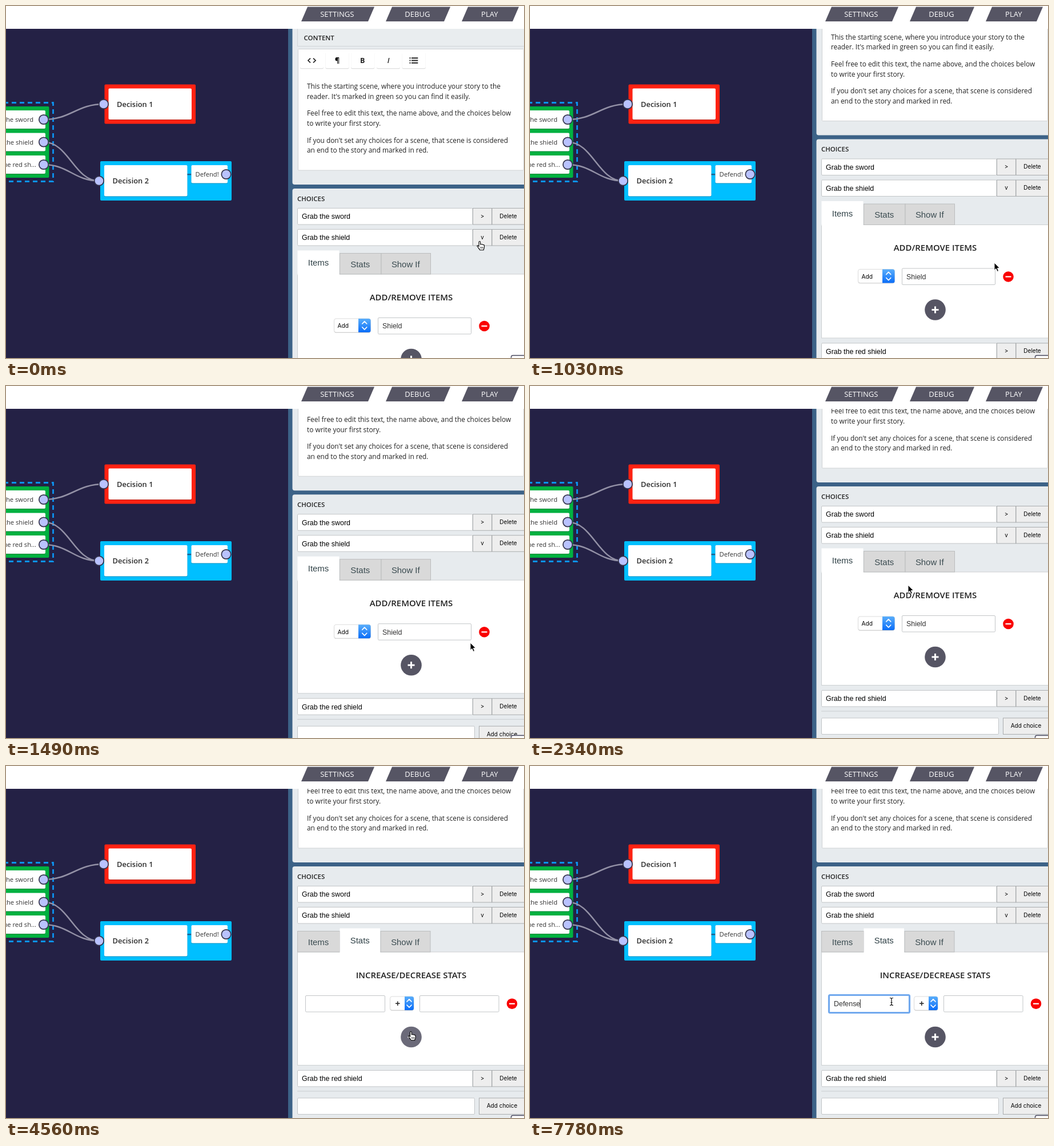
Write an HTML page that moves like this. It is 907 px wide and 617 px high and loops after 8000 ms.

```html
<!DOCTYPE html>
<html lang="en">
<head>
<meta charset="utf-8">
<title>Story editor</title>
<style>
html, body { margin: 0; width: 100%; height: 100%; overflow: hidden; background: #fff; }
svg { display: block; width: 907px; height: 617px; }
text { font-family: "Open Sans", "Noto Sans", sans-serif; white-space: pre; }
.in { font-family: "Liberation Sans", Arial, sans-serif; }
.ui { font-family: Inter, sans-serif; }
</style>
</head>
<body>
<svg id="stage" viewBox="0 0 907 617" xmlns="http://www.w3.org/2000/svg"></svg>
<script>
const LOOP = 8000;
const DARK = '#565564', PANEL = '#e7ebee', BLUE = '#3c6287';

// Drawing helpers; text is placed by the middle of its capitals.
const rect = (x, y, w, h, fill, extra = '') =>
  `<rect x="${x}" y="${y}" width="${w}" height="${h}" fill="${fill}" ${extra}/>`;
const text = (x, mid, s, size, extra = '') =>
  `<text x="${x}" y="${mid + size * 0.36}" font-size="${size}" ${extra}>${s}</text>`;
const path = (d, stroke, w, extra = '') =>
  `<path d="${d}" fill="none" stroke="${stroke}" stroke-width="${w}" ${extra}/>`;
const MID = 'text-anchor="middle" ', END = 'text-anchor="end" ', SEMI = 'font-weight="600" ';
const IN = 'class="in" ', UI = 'class="ui" ';

const skewButton = (x, w, label) =>
  `<path d="M${x + 11} 1.5H${x + w}L${x + w - 11} 27H${x}Z" fill="${DARK}"/>` +
  text(x + w / 2 - 1.2, 14.3, label, 13.06, MID + 'fill="#fff"');

const port = (x, y) =>
  `<circle cx="${x}" cy="${y}" r="8.2" fill="#b9c2ff" stroke="#34334a" stroke-width="1.7"/>`;
const wire = (x1, y1, x2, y2) => {
  const d = (x2 - x1) * 0.45;
  return path(`M${x1} ${y1}C${x1 + d} ${y1} ${x2 - d} ${y2} ${x2} ${y2}`, '#9391a6', 2.5);
};
const card = (x, y, w, h) =>
  rect(x, y + 1, w, h, '#000', 'opacity=".25" rx="2"') + rect(x, y, w, h, '#fff', 'rx="2"');

const field = (x, y, w, value = '') =>
  rect(x + .5, y + .5, w, 28.5, '#fff', 'stroke="#c3c6c8" rx="1.5"') +
  text(x + 8, y + 15, value, 12.43, IN);
const button = (x, y, w, label, cx) =>
  rect(x + .5, y + .5, w, 28.5, '#eeeeee', 'stroke="#a9acae"') +
  text(cx, y + 14.3, label, 10, UI + MID);
const choice = (y, value, mark) =>
  field(510, y, 306.5, value) + button(817, y, 33, mark, 834) + button(850.5, y, 70, 'Delete', 879.5);

const select = (x, y, w, arrowW, label) => {
  const c = x + w - arrowW / 2, m = y + 12;
  return rect(x, y + .8, w, 24, '#000', 'opacity=".25" rx="3.5"') +
    rect(x, y, w, 24, '#fff', 'stroke="#d4d4d4" stroke-width=".8" rx="3.5"') +
    `<path d="M${x + w - arrowW} ${y}h${arrowW - 3.5}q3.5 0 3.5 3.5v17q0 3.5 -3.5 3.5h${3.5 - arrowW}z" fill="url(#arrow)"/>` +
    path(`M${c - 4} ${m - 3}l4 -4.2l4 4.2M${c - 4} ${m + 3}l4 4.2l4 -4.2`, '#fff', 1.7,
      'stroke-linecap="round" stroke-linejoin="round"') + label;
};
const minus = (x, y) =>
  `<circle cx="${x}" cy="${y}" r="9.3" fill="#f90000"/>` + rect(x - 5, y - 1.1, 10, 2.2, '#fff');
const plus = id => `<g id="${id}"><circle r="18.3" fill="${DARK}"/>` +
  path('M-6 0H6M0 -6V6', '#fff', 3) + '</g>';

const tab = (x, w, label, active) => active
  ? rect(x + .5, 428.5, w - 1, 43, '#fff') + text(x + w / 2, 449.7, label, 14.9, IN + MID + 'fill="#2f4046"')
  : rect(x + .5, 433.5, w, 36.5, '#d9d9d9', 'stroke="#bbbdbe"') +
    text(x + w / 2, 452.2, label, 14.9, IN + MID + 'fill="#3a4b50"');
const tabs = (edges, on) => ['Items', 'Stats', 'Show If']
  .map((s, i) => tab(edges[i], edges[i + 1] - edges[i], s, i === on)).join('');
const heading = s => text(709.5, 510.3, s, 14.92, MID + SEMI + 'fill="#222"');

const nodes = () =>
  rect(0, 40, 494, 577, '#242145') +
  rect(-20, 176, 95.5, 125, '#00b140', 'rx="2"') +
  [183, 222.5, 262].map(y => card(-20, y, 89, 32)).join('') +
  text(48, 199, 'Grab the sword', 11.2, END + 'fill="#333"') +
  text(48, 238.5, 'Grab the shield', 11.2, END + 'fill="#333"') +
  text(53, 278, 'Grab the red sh...', 11.2, END + 'fill="#333"') +
  path('M-4 169.5H82.5V307.5H-4', '#0c93f2', 2.8, 'stroke-dasharray="8 6"') +
  wire(66, 199, 171, 172) + wire(66, 238.5, 163, 306.5) + wire(66, 278, 163, 306.5) +
  rect(172.5, 137.5, 159.5, 69, '#ff2212', 'rx="2"') + card(179.5, 144.5, 145.5, 54.5) +
  text(194, 172.3, 'Decision 1', 12.9, SEMI + 'fill="#2b2b2b"') +
  rect(165, 272, 230, 69, '#00bfff', 'rx="2"') + card(172, 279, 145.5, 54.5) +
  rect(317.5, 294, 7, 2.4, '#1c5f8c') + card(324.5, 279, 63.5, 31.5) +
  text(186.5, 306.8, 'Decision 2', 12.9, SEMI + 'fill="#2b2b2b"') +
  text(331.5, 295, 'Defend!', 11.2, 'fill="#333"') +
  port(66, 199) + port(66, 238.5) + port(66, 278) + port(171, 172) + port(163, 306.5) + port(385.5, 295);

const toolbar = () =>
  [515, 559.5, 604.2, 649, 693.7].map(x =>
    rect(x, 81.5, 41, 28.8, '#000', 'opacity=".13" rx="2"') + rect(x, 80, 41, 29, '#fff', 'rx="2"')).join('') +
  path('M533 91.7l-4 3.8l4 3.8M538 91.7l4 3.8l-4 3.8', '#222', 1.7) +
  text(580, 95.5, '¶', 13, MID + 'font-weight="700"') +
  text(624.3, 95.5, 'B', 12.5, MID + 'font-weight="700" fill="#222"') +
  text(669.5, 95.5, 'I', 12.5, MID + SEMI + 'font-style="italic" fill="#222"') +
  path('M710 91.3h11.3M710 95.5h11.3M710 99.7h11.3', '#222', 1.9) +
  path('M706.5 91.3h2M706.5 95.5h2M706.5 99.7h2', '#222', 1.9);

const story = [
  [141, 'This the starting scene, where you introduce your story to the'],
  [158.7, "reader. It's marked in green so you can find it easily."],
  [188.2, 'Feel free to edit this text, the name above, and the choices below'],
  [206, 'to write your first story.'],
  [235.5, "If you don't set any choices for a scene, that scene is considered"],
  [253, 'an end to the story and marked in red.']
];

const content = () =>
  rect(501.5, 0, 420, 313, PANEL, 'rx="4"') +
  rect(510.5, 30.5, 420, 40, '#e9edef', 'stroke="#d2d6d9"') +
  text(521.5, 56, 'CONTENT', 11.45, SEMI + 'fill="#222"') +
  rect(511.5, 75.5, 395, 212.5, '#fff', 'stroke="#d0d3d5" rx="1"') + toolbar() +
  story.map(([y, s]) => text(527, y, s, 11.87, 'fill="#222"')).join('');

const choices = () =>
  `<rect id="box" x="501.5" y="320" width="420" fill="${PANEL}" rx="4"/>` +
  text(510, 337.6, 'CHOICES', 11.45, SEMI + 'fill="#222"') +
  choice(354, 'Grab the sword', '&gt;') + choice(391, 'Grab the shield', 'v') +
  '<rect id="pane" x="510.5" y="470" width="420" fill="#fff" stroke="#cdd0d2"/>' +
  '<g id="items">' + tabs([510, 584, 656.5, 743], 0) + heading('ADD/REMOVE ITEMS') +
  select(574.5, 548, 64, 21.5, text(580.5, 560.7, 'Add', 10.2, UI)) +
  field(651, 546, 163, '<tspan fill="#333">Shield</tspan>') + minus(837.5, 561) + '</g>' +
  '<g id="stats">' + tabs([510, 584, 655.5, 742.5], 1) + heading('INCREASE/DECREASE STATS') +
  '<g id="none">' + text(709.5, 557.5, 'No Stats', 14.92, MID + 'fill="#222"') + '</g>' +
  '<g id="row">' + field(524, 546, 139) +
  rect(523.5, 545.5, 141, 31, '#fff', 'id="ring" stroke="#71a9ee" stroke-width="3.2" rx="2"') +
  `<text id="typed" class="in" x="532" y="564.9" font-size="12.43" fill="#333"></text>` +
  rect(532, 553, 1, 15, '#222', 'id="caret"') +
  select(672.5, 548, 41.5, 16, path('M682 560.2h7.6M685.8 556.4v7.6', '#222', 1.5)) +
  field(724, 546, 138.5) + minus(886, 560.7) + '</g></g>' + plus('plus') +
  '<g id="tail">' + choice(677, 'Grab the red shield', '&gt;') +
  rect(510, 713.5, 410, 1, '#c9cdd0') + field(510, 725.5, 310) +
  button(828, 725.5, 90, 'Add choice', 868.5) + '</g>';

const cursors = () =>
  '<g id="arrowCur"><path d="M0 0V13.2L3 10.4L5.1 15.4L7.5 14.4L5.3 9.6H9.4Z" fill="#000" stroke="#fff" stroke-width="1"/></g>' +
  '<g id="handCur"><path d="M-1.5 8.5V1Q-1.5 -.5 -.2 -.5T1.2 1V5Q2 4 3.6 5Q4.8 4.4 5.8 5.6Q8 5 8 7.4V10Q8 12 6.8 13.6V14.8H.2Q-.8 12.6 -2.4 11L-4.4 8.2Q-5 6.6 -3.4 6.8Z" fill="#fff" stroke="#000" stroke-width="1.1" stroke-linejoin="round"/>' +
  path('M1.6 9.2v3M3.6 9.2v3M5.6 9.2v3', '#000', .8) + '</g>' +
  '<g id="beamCur">' + path('M-3 -6.5Q0 -6.5 0 -4.5Q0 -6.5 3 -6.5M0 -4.5V4.5M-3 6.5Q0 6.5 0 4.5Q0 6.5 3 6.5M-1.5 1.5H1.5', '#111', 1.2) + '</g>';

document.getElementById('stage').innerHTML =
  '<defs><linearGradient id="arrow" x2="0" y2="1"><stop stop-color="#5aaefb"/><stop offset="1" stop-color="#0a6df8"/></linearGradient></defs>' +
  nodes() + rect(494, 40, 413, 577, BLUE) +
  '<g id="scroll">' + content() + choices() + '</g>' +
  rect(0, 0, 907, 40, '#fff') +
  skewButton(517, 128, 'SETTINGS') + skewButton(665, 113, 'DEBUG') + skewButton(798, 100, 'PLAY') +
  rect(884.5, 612.5, 40, 20, '#fff', 'stroke="#45445a" stroke-width="1.3" rx="3"') + cursors();

const el = {};
document.querySelectorAll('svg [id]').forEach(e => el[e.id] = e);
const show = (e, on) => e.setAttribute('display', on ? 'inline' : 'none');
const set = (e, props) => { for (const k in props) e.setAttribute(k, props[k]); };

// Each burst of movement advances in even steps: start, end, count.
const bursts = [[110, 260, 3], [620, 1370, 14], [1430, 2230, 14], [2280, 2850, 11], [3390, 4020, 12], [4910, 5260, 7]];
function stepped(t) {
  const b = bursts.filter(b => t >= b[0]).pop();
  if (!b) return 0;
  const d = (b[1] - b[0]) / (b[2] - 1);
  return b[0] + d * Math.min(b[2] - 1, Math.floor((t - b[0]) / d + 0.1));
}

function track(keys, t) {
  if (t <= keys[0][0]) return keys[0].slice(1);
  for (let i = 1; i < keys.length; i++) {
    const a = keys[i - 1], b = keys[i];
    if (t <= b[0]) return a.slice(1).map((v, j) => v + (b[j + 1] - v) * (t - a[0]) / (b[0] - a[0]));
  }
  return keys[keys.length - 1].slice(1);
}

const scrollKeys = [[562, 0], [678, 14], [793, 40], [1000, 83], [1170, 108], [1312, 120.5], [1370, 124], [1750, 142], [1900, 144]];
const pointKeys = [
  [35, 829.5, 413], [185, 819, 434], [260, 813, 450], [1800, 813, 450], [2000, 735, 405], [2230, 662.5, 365],
  [2337, 662, 349], [2560, 643, 330], [2850, 633, 323], [3333, 633, 323], [3505, 674, 388],
  [3750, 702, 452], [4020, 709, 466], [4853, 709, 466], [5090, 660, 425], [5260, 633, 413]
];
const typing = [[5980, 1], [6520, 2], [6820, 3], [7410, 4], [7500, 5], [7590, 6], [7690, 7]];
const caretOff = [[5920, 5980], [6400, 6520], [7060, 7410]];

function draw(t) {
  const m = stepped(t);
  const y = track(scrollKeys, m)[0];
  const [px, py] = track(pointKeys, m);
  const stats = t >= 3150, row = t >= 4560, focus = t >= 5440;
  const lift = stats && !row ? 7 : 0;

  set(el.scroll, { transform: `translate(0 ${-y})` });
  set(el.box, { height: 446 - lift });
  set(el.pane, { height: 198.5 - lift });
  set(el.tail, { transform: `translate(0 ${-lift})` });
  show(el.items, !stats);
  show(el.stats, stats);
  show(el.none, !row);
  show(el.row, row);
  show(el.ring, focus);

  const plusY = 619 - lift;
  const hover = stats && Math.hypot(px - 709.5, py + y - plusY) < 18.3;
  set(el.plus, { transform: `translate(709.5 ${plusY})` });
  el.plus.firstChild.setAttribute('fill', hover ? '#6b6a79' : DARK);

  const n = typing.filter(k => t >= k[0]).length;
  el.typed.textContent = 'Defense'.slice(0, n);
  set(el.caret, { x: 532 + (n ? el.typed.getComputedTextLength() - .5 : .5) });
  show(el.caret, focus && !caretOff.some(([a, b]) => t >= a && t < b));

  const beam = row && px < 664 && py < 432;
  const hand = !beam && (t < 110 || hover || (t > 2280 && py < 326));
  show(el.handCur, hand);
  show(el.beamCur, beam);
  show(el.arrowCur, !hand && !beam);
  const cur = hand ? el.handCur : beam ? el.beamCur : el.arrowCur;
  set(cur, { transform: `translate(${px} ${py})` });
}

const start = performance.now();
function frame() {
  draw((performance.now() - start) % LOOP);
  requestAnimationFrame(frame);
}
frame();
</script>
</body>
</html>
```
